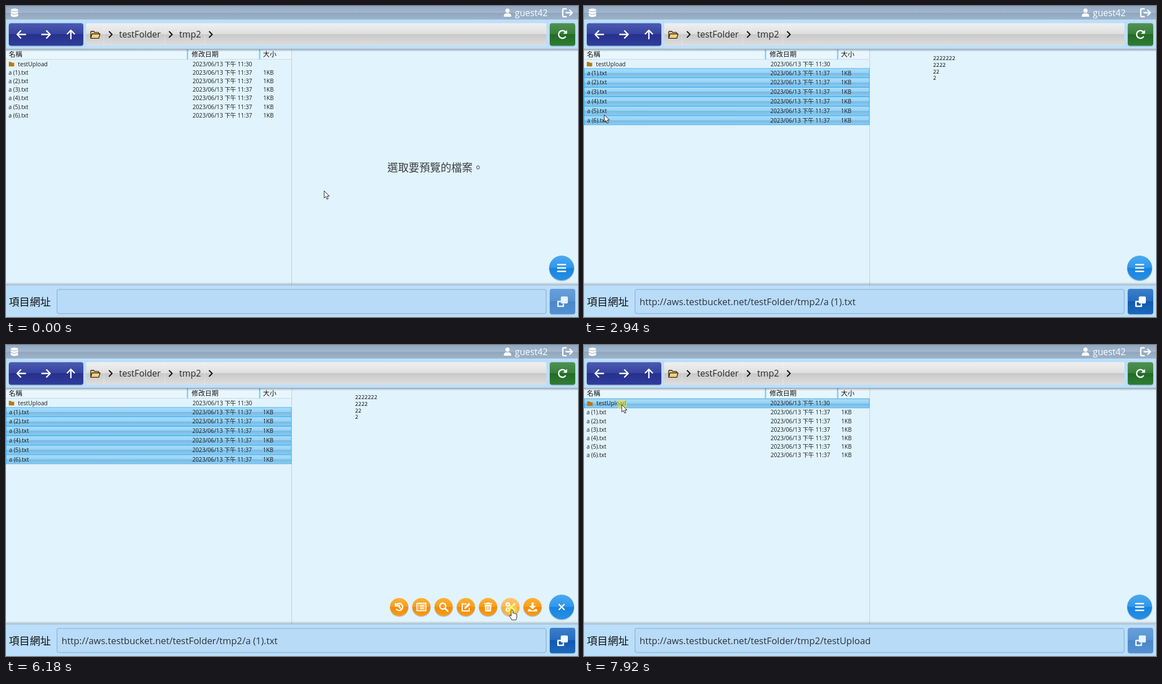
Write an HTML page that moves like this. It is 1014 px wide and 552 px high and loops after 8 s.

```html
<!DOCTYPE html>
<html lang="zh-Hant">
<head>
<meta charset="utf-8">
<title>File manager</title>
<style>
html, body { margin: 0; width: 100%; height: 100%; overflow: hidden; background: #e1f3fd; }
svg { display: block; width: 100vw; height: 100vh; }
text { font-family: "Open Sans", "Noto Sans CJK TC", "Noto Sans CJK", sans-serif; white-space: pre; }
.mono { font-family: "Noto Sans Mono", "DejaVu Sans Mono", monospace; }
.line { fill: none; stroke: #fff; stroke-width: 2.4; stroke-linecap: round; stroke-linejoin: round; }
.white { fill: #fff; }
</style>
</head>
<body>
<svg id="stage" viewBox="0 0 1014 552"></svg>
<script>
const LOOP = 8000;
const stage = document.getElementById('stage');

// ---------- helpers ----------
const clamp = x => Math.max(0, Math.min(1, x));
const smooth = x => x * x * (3 - 2 * x);
const easeOut = x => 1 - (1 - x) ** 2;
const easeIn = x => x ** 1.7;

const gradient = (id, stops) => `<linearGradient id="${id}" x2="0" y2="1">` +
  stops.map(([at, color, alpha = 1]) =>
    `<stop offset="${at}" stop-color="${color}" stop-opacity="${alpha}"/>`).join('') + '</linearGradient>';
const gloss = (id, a, b, c, d) => gradient(id, [[0, a], [.5, b], [.5, c], [1, d]]);
const rect = (x, y, w, h, fill, more = '') =>
  `<rect x="${x}" y="${y}" width="${w}" height="${h}" fill="${fill}" ${more}/>`;
const circle = (x, y, r, fill, more = '') => `<circle cx="${x}" cy="${y}" r="${r}" fill="${fill}" ${more}/>`;
const text = (x, y, size, str, fill = '#1c1c1c', more = '') =>
  `<text x="${x}" y="${y}" font-size="${size}" fill="${fill}" ${more}>${str}</text>`;
const path = (d, cls = 'line', more = '') => `<path class="${cls}" d="${d}" ${more}/>`;
const place = (x, y, body, more = '') => `<g transform="translate(${x} ${y}) ${more}">${body}</g>`;
const button = (x, y, w, h, fill) =>
  rect(x - .5, y + .5, w + 1, h + 1, '#000', 'rx="5" opacity=".16"') + rect(x, y, w, h, fill, 'rx="4"');
const disc = (r, fill) => circle(0, 1, r + .6, '#000', 'opacity=".2"') + circle(0, 0, r, fill);

// ---------- fixed parts ----------
const defs = '<defs>' +
  gloss('bar', '#8fa9c4', '#a3b8cd', '#8fa6be', '#9db3c9') +
  gloss('indigo', '#4c5ab0', '#3543a0', '#27318c', '#2f3d9b') +
  gloss('green', '#4f9153', '#37803b', '#236b28', '#2f7d33') +
  gloss('crumb', '#f0f0f0', '#dedede', '#c9c9c9', '#dedede') +
  gloss('row', '#a9defb', '#94d2f6', '#79b8e1', '#8dccf1') +
  gloss('blue', '#4ba9f1', '#2f97ea', '#1a83dd', '#2590e6') +
  gloss('navy', '#3c7fcb', '#236cbd', '#1259ae', '#1c68bd') +
  gloss('orange', '#ffb136', '#fd9d17', '#f38a00', '#fa9c14') +
  gradient('under', [[0, '#123', .38], [1, '#123', 0]]) +
  gradient('over', [[0, '#123', 0], [1, '#123', .28]]) + '</defs>';

const chevron = x => path(`M${x - 2.5} 45.5l5 5l-5 5`, 'line', 'style="stroke:#111;stroke-width:2"');
const arrow = (x, angle) => place(x, 50.5, path('M7.5 0H-7M-1-6.3L-7.3 0L-1 6.3'), `rotate(${angle})`);

const backdrop = rect(0, 0, 1014, 552, '#e1f3fd') +
  rect(506, 77, 1, 419, '#bdd3e0') +
  rect(0, 77, 506, 18, '#e8f6fe') + rect(0, 94.3, 506, .8, '#c6d2da') +
  [320.5, 448.5].map(x => rect(x, 77, 2.5, 18, '#81d0f7')).join('') +
  [[5, '名稱'], [329, '修改日期'], [455.5, '大小']].map(([x, s]) => text(x, 90, 11.9, s, '#111')).join('');

const chrome =
  rect(0, 76, 1014, 5, 'url(#under)') + rect(0, 490, 1014, 6, 'url(#over)') +
  rect(0, 24, 1014, 52, '#bbdefb') + rect(0, 0, 1014, 24, 'url(#bar)') +
  // database, account and sign-out icons
  path('M8.5 7A6.5 2.6 0 0 1 21.5 7V17A6.5 2.6 0 0 1 8.5 17Z', 'white') +
  path('M8.5 8.6Q15 12.4 21.5 8.6M8.5 13Q15 16.8 21.5 13', 'line', 'style="stroke:#92a9c1;stroke-width:1"') +
  circle(889, 8.3, 3.7, '#fff') + path('M882.3 19Q882.3 13 887 13H891Q895.7 13 895.7 19Z', 'white') +
  text(902, 18, 15.8, 'guest42', '#fff') +
  path('M993 5H989Q987 5 987 7V17Q987 19 989 19H993M993 12H1003M999.5 7.5L1004 12L999.5 16.5') +
  button(5, 30.5, 132, 40, 'url(#indigo)') + arrow(27, 0) + arrow(71, 180) + arrow(115, 90) +
  rect(142, 30.5, 816, 40, 'url(#crumb)', 'rx="2"') +
  [173, 281, 352].map(x => rect(x, 31, 1, 39, '#fff', 'opacity=".3"')).join('') +
  path('M150.2 57.3V46Q150.2 45 151.2 45H155.5L157.2 46.8H163.5Q164.5 46.8 164.5 48V49.5H166.6L164.6 57.3ZL152.4 49.5H164.5',
    'folder', 'fill="#f8cf80" stroke="#2a2417" stroke-width="1.3" stroke-linejoin="round"') +
  [185.5, 292, 363].map(chevron).join('') +
  text(200.5, 56, 15.7, 'testFolder', '#2b2b2b') + text(307, 56, 15.7, 'tmp2', '#2b2b2b') +
  button(964, 30.5, 45, 40, 'url(#green)') +
  place(986.5, 50.5, path('M5.2 4.3A6.8 6.8 0 1 1 5-4.6L6.5-2.8') + path('M8-8V-1.2H1.2Z', 'white')) +
  rect(0, 496, 1014, 56, '#bbdefb') +
  text(5, 532, 18.6, '項目網址', '#111', 'font-weight="500"') +
  rect(90.5, 503, 867, 43, '#b8dbf8', 'rx="3" stroke="#83a9cd"');

// ---------- floating menu ----------
const MENU = [
  path('M-6.5-6V-2H-2.5M-5.8-2.8A6.3 6.3 0 1 1-4.8 4.2M0-3.2V.5L2.3 2'),
  path('M-8-6.5H8V6.5H-8ZM-2-3H5M-2 0H5M-2 3H5M-5-3h.1M-5 0h.1M-5 3h.1', 'line', 'style="stroke-width:1.8"'),
  circle(-1.5, -1.5, 5.2, 'none', 'class="line"') + path('M2.6 2.6L7.2 7.2', 'line', 'style="stroke-width:3"'),
  path('M0-5.5H-6.5V7H6V2', 'line', 'style="stroke-width:2"') + path('M-2.8 3.4L-2 0L5-7.4L8-4.4L.8 2.6Z', 'white'),
  path('M-7-7H-2.5L-2-8.3H2L2.5-7H7V-5H-7ZM-6-4H6L5.2 8H-5.2Z', 'white') +
    path('M-2.8-1.5V5.5M0-1.5V5.5M2.8-1.5V5.5', 'line', 'style="stroke:#f79a1a;stroke-width:1.1"'),
  path('M-2-3L8 5.8M-2 3L8-5.8') + [-4.5, 4.5].map(y => circle(-4.5, y, 2.7, 'none', 'class="line"')).join(''),
  path('M-2-8H2V-2H6.3L0 4L-6.3-2H-2ZM-8 3.8H-4.4L0 7L4.4 3.8H8V8H-8Z', 'white')
];
const FAB = { x: 985, y: 465, r: 22 };
const menuX = i => 697 + 39.4 * i;
const near = (p, x, y, r) => Math.hypot(p.x - x, p.y - y) < r;
const phase = (t, length) => t < 6300 ? clamp((t - 4195) / length) : 1 - clamp((t - 6300) / length);

function drawMenu(t, pointer) {
  const x = phase(t, 180);
  const p = t < 6300 ? easeIn(x) : 1 - easeIn(1 - x);
  if (p <= 0) return '';
  const scale = .4 + .6 * p;
  const cx = 815.2 + scale * (1 - p) * 198;
  const items = MENU.map((icon, i) => {
    const glow = p === 1 && near(pointer, menuX(i), 465, 16) ? circle(0, 0, 16, '#fff', 'opacity=".28"') : '';
    return place(menuX(i) - 815.2, 0, disc(16, 'url(#orange)') + glow + icon);
  }).join('');
  return `<g opacity="${p}">${place(cx, 465, items, `scale(${scale})`)}</g>`;
}

function drawFab(t, pointer) {
  const turn = 1 - (1 - phase(t, 400)) ** 1.8;
  const lit = near(pointer, FAB.x, FAB.y, FAB.r) || (t >= 6300 && t < 7800);
  return place(FAB.x, FAB.y, disc(FAB.r, 'url(#blue)') +
    (lit ? circle(0, 0, FAB.r, '#fff', 'opacity=".2"') : '') +
    path('M-7-6H7M-7 0H7M-7 6H7', 'line', `transform="rotate(${180 * turn})" opacity="${1 - turn}"`) +
    path('M-4.5-4.5L4.5 4.5M4.5-4.5L-4.5 4.5', 'line', `transform="rotate(${180 * turn - 180})" opacity="${turn}"`));
}

// ---------- file list ----------
function drawRows(selected) {
  let y = 95.3, out = '';
  for (let i = 0; i < 7; i++) {
    const on = selected(i), h = on ? 16.8 : 15.2, base = y + h / 2 + 3.7;
    const dx = on ? .8 : 0, back = on ? -.5 : 0;
    if (on) out += rect(.4, y + .4, 505.4, h - .8, 'url(#row)', 'stroke="#3eaef0" stroke-width=".9"');
    if (i) out += text(4.6 + dx, base, 10.1, `a (${i}).txt`) + text(456 + back, base, 10.1, '1KB');
    else out += path('M5 99.3H9L10.3 100.7H14.5V107.2H5Z', 'folder', `fill="#b97a0a" transform="translate(${dx} ${dx})"`) +
      text(21.3 + dx, base, 10.3, 'testUpload');
    out += text(330.7 + back, base, 10.2, `2023/06/13 下午 11:${i ? 37 : 30}`);
    y += h;
  }
  return out;
}

// ---------- pointer ----------
// start, end, control point, goal, easing
const MOVES = [
  [400, 1080, 250, 345, 36, 116, smooth],
  [1750, 2090, 36, 154, 36, 192, smooth],
  [2550, 2551, 36, 192, 36, 193, smooth],
  [3340, 4090, 480, 330, 980, 466, smooth],
  [4850, 5570, 945, 490, 897, 470, smooth],
  [6400, 7250, 430, 215, 77, 107, easeOut],
  [7390, 7600, 72, 107, 67, 106, smooth]
];
const CLICKS = [[1220, 1420], [2810, 2940], [4160, 4230], [6180, 6300], [7720, 8000]];

function pointerAt(t) {
  let p = { x: 564, y: 328 };
  for (const [from, to, cx, cy, x, y, ease] of MOVES) {
    if (t < from) break;
    const u = ease(clamp((t - from) / (to - from))), v = 1 - u;
    p = { x: v * v * p.x + 2 * u * v * cx + u * u * x, y: v * v * p.y + 2 * u * v * cy + u * u * y };
  }
  return p;
}

function drawPointer(t, p) {
  const menuOpen = t > 4375 && t < 6300;
  const hand = near(p, FAB.x, FAB.y, FAB.r) || (menuOpen && MENU.some((_, i) => near(p, menuX(i), 465, 16)));
  const shape = hand
    ? 'M-1.5 1.3Q0-1 1.5 1.3V6Q3 5 4.2 6.6Q5.8 5.8 6.6 7.4Q8.6 7 8.6 9V13Q8 15.5 7 18H-.5Q-2 14-5 10.6Q-4.6 8.4-1.5 11Z'
    : 'M0 0V12.8L3 10.2L5 15L7.2 14L5.2 9.4H9.2Z';
  const ring = CLICKS.some(([a, b]) => t >= a && t < b) ? circle(0, -.5, 9, '#f0ea28', 'opacity=".55"') : '';
  return place(p.x, p.y, ring + path(shape, 'pointer', 'fill="#fff" stroke="#111" stroke-width=".9" stroke-linejoin="round"'));
}

// ---------- picture at one time ----------
function draw(t) {
  const pointer = pointerAt(t);
  const selected = i => t >= 7800 ? i === 0 : t >= 2940 ? i > 0 : t >= 1290 && i === 1;
  const previewing = t >= 1350 && t < 7800;
  const item = t < 1350 ? '' : t < 7800 ? 'a (1).txt' : 'testUpload';
  const preview = previewing
    ? [7, 4, 2, 1].map((n, i) => text(618.7, 96 + 11.8 * i, 9.4, '2'.repeat(n), '#111', 'class="mono"')).join('')
    : t < 1350 ? text(676, 293.8, 18.9, '選取要預覽的檔案。', '#3a3f42', 'font-weight="300"') : '';
  const url = item && text(98.5, 530.5, 16.36, 'http://aws.testbucket.net/testFolder/tmp2/' + item, '#2b3540');
  const copy = button(964, 502, 45, 45, 'url(#navy)') +
    path('M983 524.5H978.5V533H988V529.5', 'line', 'style="stroke-width:2.6"') +
    rect(983.5, 515.5, 12.5, 12.5, '#fff', 'rx="2"');
  return drawRows(selected) + preview + drawMenu(t, pointer) + drawFab(t, pointer) +
    url + `<g opacity="${previewing ? 1 : .65}">${copy}</g>` + drawPointer(t, pointer);
}

stage.innerHTML = defs + backdrop + chrome + '<g id="live"></g>';
const live = document.getElementById('live');
const start = performance.now();
function frame() {
  live.innerHTML = draw((performance.now() - start) % LOOP);
  requestAnimationFrame(frame);
}
frame();
</script>
</body>
</html>
```
